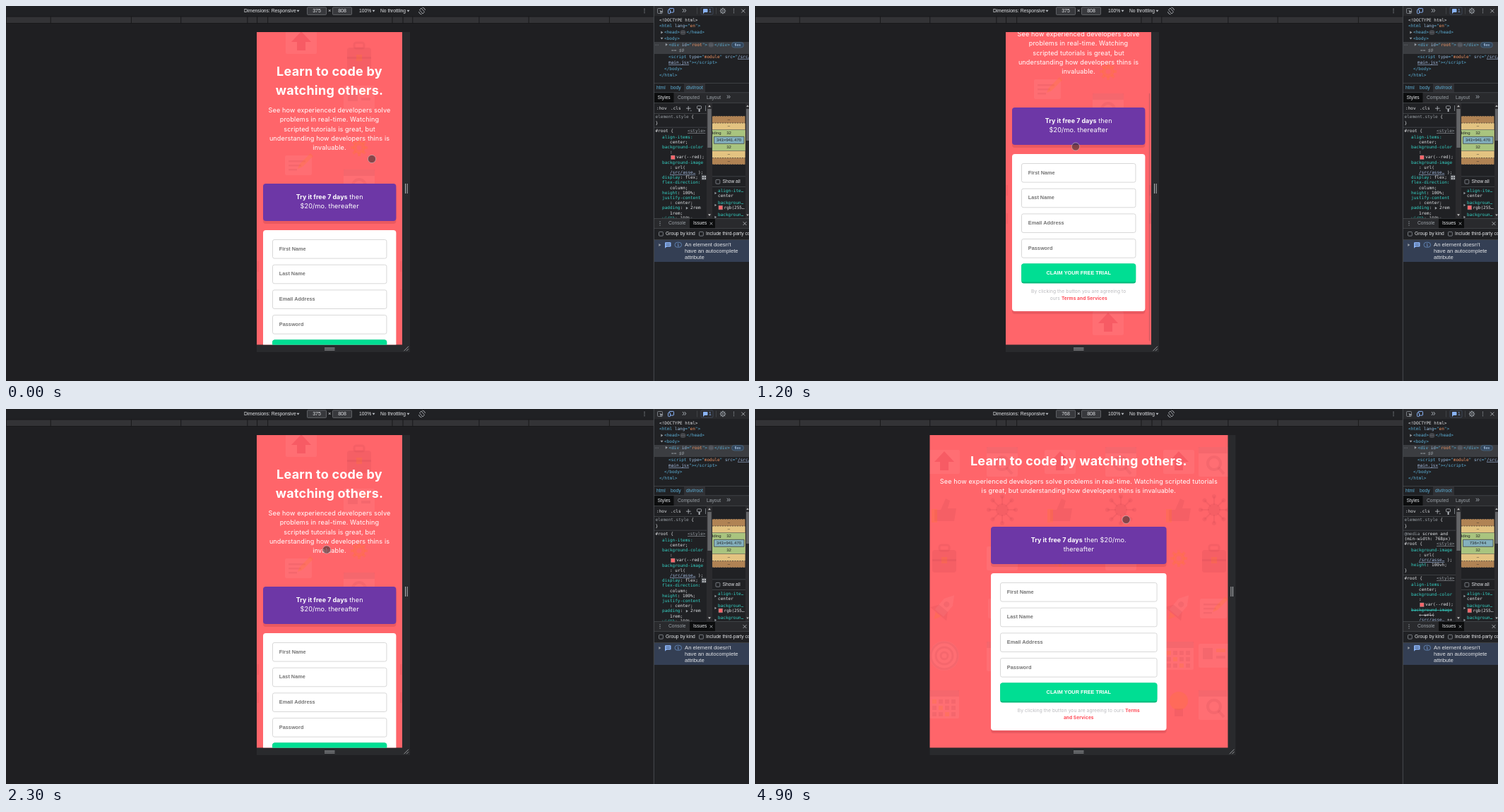
Animation, 1052 px wide and 532 px high, one loop 8 s. Source, as an HTML page with a canvas:

```html
<!DOCTYPE html>
<html lang="en">
<head>
<meta charset="utf-8">
<title>Responsive preview</title>
<style>
html, body { margin: 0; width: 100%; height: 100%; overflow: hidden; background: #202124; }
canvas { display: block; width: 1052px; height: 532px; }
</style>
</head>
<body>
<canvas id="stage"></canvas>
<script>
const W = 1052, H = 532, LOOP = 8000;
const canvas = document.getElementById('stage');
const c = canvas.getContext('2d');
const dpr = window.devicePixelRatio || 1;
canvas.width = W * dpr;
canvas.height = H * dpr;

const SANS = '"Liberation Sans", Arial, sans-serif';
const MONO = '6.04px "DejaVu Sans Mono", monospace';
const ROUND = 'Inter, sans-serif';
const FG = '#e3e5e8', DIM = '#9aa0a6', BLUE = '#8ab4f8', LINE = '#494c50';
const TAG = '#5db0d7', ATTR = '#9bbbdc', VAL = '#f29766', PROP = '#35d4c7', LINK = '#a9c1e8';
const RED = '#ff656a';

// Type styles: font and tracking
const TITLE = ['700 18px ' + ROUND, 0.24];
const BODY = ['400 9.1px ' + ROUND, 0.12];
const STRONG = ['700 8.9px ' + ROUND, 0.04];
const NOTE = ['400 6.6px ' + ROUND, 0.11];
const NOTE_B = ['700 6.6px ' + ROUND, 0.06];

// Each row is a start time followed by the values held from then on
const POINTER = [
  [0, 518, 217], [100, 498, 212], [200, 470, 204], [300, 454, 199.5],
  [2500, 460, 166], [2600, 472, 111.5], [3300], [4600, 526, 151], [4900, 525.5, 157]
];
const SCROLL = [[0, 0], [600, 40], [700, 92], [800, 108], [1600, 40.5], [1700, 0]];
const THUMB = [
  [0, 0], [600, 1], [1100, 0.7], [1200, 0.35], [1300, 0], [1600, 1],
  [2000, 0.75], [2100, 0.5], [2200, 0.25], [2300, 0]
];
const at = (keys, t) => keys.filter(k => k[0] <= t).pop().slice(1);

function rect(x, y, w, h, fill) {
  c.fillStyle = fill;
  c.fillRect(x, y, w, h);
}

function box(x, y, w, h, r, fill, stroke, width = 0.7) {
  c.beginPath();
  c.roundRect(x, y, w, h, r);
  if (fill) { c.fillStyle = fill; c.fill(); }
  if (stroke) { c.strokeStyle = stroke; c.lineWidth = width; c.stroke(); }
}

function path(pts, fill, stroke, width = 0.8) {
  c.beginPath();
  for (let i = 0; i < pts.length; i += 2) c.lineTo(pts[i], pts[i + 1]);
  if (fill) { c.closePath(); c.fillStyle = fill; c.fill(); }
  if (stroke) { c.strokeStyle = stroke; c.lineWidth = width; c.stroke(); }
}

function disc(x, y, r, fill, stroke, width = 0.8) {
  c.beginPath();
  c.arc(x, y, r, 0, Math.PI * 2);
  if (fill) { c.fillStyle = fill; c.fill(); }
  if (stroke) { c.strokeStyle = stroke; c.lineWidth = width; c.stroke(); }
}

function text(str, x, y, font, color, align = 'left', track = 0) {
  c.font = font;
  c.letterSpacing = track + 'px';
  c.textAlign = align;
  c.textBaseline = 'middle';
  c.fillStyle = color;
  c.fillText(str, x, y);
  return c.measureText(str).width;
}

const ui = (str, x, y, color = FG, size = 6.7, align = 'left') =>
  text(str, x, y, size + 'px ' + SANS, color, align);

// Centred line made of [text, style, colour] runs
function centred(x, y, ...runs) {
  const widths = runs.map(([str, [font, track]]) => {
    c.font = font;
    c.letterSpacing = track + 'px';
    return c.measureText(str).width;
  });
  x -= widths.reduce((a, b) => a + b, 0) / 2;
  runs.forEach(([str, [font, track], color = '#fff'], i) => {
    text(str, x, y, font, color, 'left', track);
    x += widths[i];
  });
}

// Colour and text pairs; a leading "_" underlines, "-" strikes through
function code(x, y, ...parts) {
  for (let i = 0; i < parts.length; i += 2) {
    const mark = parts[i][0] === '#' ? '' : parts[i][0];
    const color = mark ? parts[i].slice(1) : parts[i];
    const w = text(parts[i + 1], x, y, MONO, color);
    if (mark) rect(x, y + (mark === '_' ? 2.9 : 0.2), w, 0.6, color);
    x += w;
  }
  return x;
}

function clip(x, y, w, h, draw) {
  c.save();
  c.beginPath();
  c.rect(x, y, w, h);
  c.clip();
  draw();
  c.restore();
}

function tri(x, y, s, color, down) {
  path(down ? [x - s, y - s * 0.6, x + s, y - s * 0.6, x, y + s * 0.8]
            : [x - s * 0.6, y - s, x + s * 0.9, y, x - s * 0.6, y + s], color);
}

const dots = (x, y) => [-2.6, 0, 2.6].forEach(d => disc(x, y + d, 0.7, DIM));

function cross(x, y, s, color = '#bdc1c6') {
  path([x - s, y - s, x + s, y + s], null, color);
  path([x - s, y + s, x + s, y - s], null, color);
}

// Faint pattern behind the page
const DARK = 'rgba(165,45,65,.11)', PALE = 'rgba(255,185,190,.11)', WARM = 'rgba(255,120,40,.24)';

const icons = {
  house() {
    box(-22, -16, 44, 34, 2, PALE);
    path([0, -14, 14, 1, 6, 1, 6, 13, -6, 13, -6, 1, -14, 1], 'rgba(225,35,60,.26)');
  },
  bag() {
    box(-17, -12, 34, 32, 4, DARK);
    box(-7, -19, 14, 8, 3, null, DARK, 3);
    rect(-17, 1, 34, 3, DARK);
    rect(-4, -2, 8, 9, WARM);
  },
  card() {
    box(-22, -17, 44, 34, 2, PALE);
    rect(-16, -11, 14, 16, DARK);
    rect(3, -10, 13, 5, WARM);
    rect(3, 0, 13, 4, DARK);
  },
  gear() {
    for (let i = 0; i < 8; i++) {
      c.rotate(Math.PI / 4);
      rect(-2, -12, 4, 5, WARM);
    }
    disc(0, 0, 6, null, WARM, 5);
  },
  note() {
    box(-20, -12, 38, 28, 2, PALE);
    [-5, 1, 7].forEach((y, i) => rect(-15, y, 24 - i * 6, 2.5, DARK));
    path([-2, 7, 1, 0, 16, -15, 20, -11, 5, 4], WARM);
  },
  browser() {
    box(-22, -20, 44, 42, 2, PALE);
    rect(-22, -20, 44, 9, DARK);
    disc(0, 3, 9, null, DARK, 4);
    path([6, 9, 14, 18], null, DARK, 4);
  },
  burst() {
    for (let i = 0; i < 8; i++) {
      c.rotate(Math.PI / 4);
      rect(-1, -19, 2, 12, DARK);
      disc(0, -19, 3, DARK);
    }
    disc(0, 0, 9, DARK);
  },
  rocket() {
    c.rotate(0.7);
    path([0, -22, 8, -9, 8, 11, -8, 11, -8, -9], PALE);
    path([-8, 2, -15, 13, 15, 13, 8, 2], DARK);
    path([-5, 13, 0, 23, 5, 13], WARM);
    disc(0, -5, 4, DARK);
  },
  target() {
    disc(0, 0, 21, PALE);
    [5, 12, 19].forEach(r => disc(0, 0, r, null, DARK, 3));
  },
  calendar() {
    box(-21, -20, 42, 40, 2, PALE);
    rect(-21, -20, 42, 9, DARK);
    for (let i = 0; i < 12; i++) rect(-17 + i % 4 * 9, -7 + (i >> 2) * 9, 6, 6, i % 5 ? DARK : WARM);
  },
  bulb() {
    disc(0, -5, 13, WARM);
    rect(-6, 6, 12, 11, DARK);
  },
  thumb() {
    path([-14, 0, -5, 0, 2, -16, 8, -13, 5, -2, 17, -2, 14, 16, -14, 16], DARK);
    rect(-18, -1, 8, 19, WARM);
  }
};

function icon(kind, x, y) {
  c.save();
  c.translate(x, y);
  icons[kind]();
  c.restore();
}

const PHONE_ICONS = [
  ['house', 418, 50], ['bag', 500, 71], ['card', 500, 130], ['note', 415, 224],
  ['gear', 500, 201], ['browser', 500, 252], ['house', 500, 557]
];
const COLUMNS = [
  [268, ['house', 'thumb', 'bag', 'rocket', 'target', 'calendar']],
  [350, ['browser', 'burst', 'card', 'note', 'browser', 'gear']],
  [432, ['house', 'thumb', 'gear', 'rocket', 'target', 'calendar']],
  [518, ['browser', 'burst', 'card', 'note', 'browser', 'gear']],
  [600, ['house', 'thumb', 'gear', 'rocket', 'calendar', 'bulb']],
  [650, ['browser', 'burst', 'bag', 'note', 'card', 'browser']]
];

// Offer banner and sign-up card, placed from the banner's top
const SHADE = 'rgba(130,30,50,.17)';

function form(x, w, top, offer, terms) {
  const mid = x + w / 2, card = top + 66, inner = x + 13.2, iw = w - 26.4;
  box(x, top + 4, w, 53, 4, SHADE);
  box(x, top, w, 53, 4, '#6d37a6');
  offer.forEach((runs, i) => centred(mid, top + 19.5 + i * 13.1, ...runs));
  box(x, card + 4, w, 223, 4, SHADE);
  box(x, card, w, 223, 4, '#fff');
  ['First Name', 'Last Name', 'Email Address', 'Password'].forEach((label, i) => {
    const y = card + 13.2 + i * 35.7;
    box(inner + 0.3, y + 0.3, iw - 0.6, 26.6, 2.5, '#fff', '#cfcfcf', 0.8);
    text(label, inner + 9.6, y + 13.4, 'bold 7.32px ' + SANS, '#757575');
  });
  box(inner, card + 155.6, iw, 28, 3.5, '#00b97a');
  box(inner, card + 155.6, iw, 26, 3.5, '#00de93');
  text('CLAIM YOUR FREE TRIAL', mid, card + 168.7, 'bold 7.32px ' + SANS, '#fff', 'center');
  terms.forEach((runs, i) => centred(mid, card + 195 + i * 9.9, ...runs));
}

const GREY = '#b9b9bd', TERMS = '#ff4c58';

function phone(scroll, thumb) {
  clip(355, 37, 206, 443.5, () => {
    rect(355, 37, 206, 444, RED);
    c.save();
    c.translate(0, -scroll);
    PHONE_ICONS.forEach(i => icon(...i));
    [355, 558].forEach(x => [362, 402].forEach(y => rect(x, y, 3, 15, DARK)));
    centred(458, 94, ['Learn to code by', TITLE]);
    centred(458, 120.3, ['watching others.', TITLE]);
    ['See how experienced developers solve', 'problems in real-time. Watching',
     'scripted tutorials is great, but', 'understanding how developers thins is', 'invaluable.'
    ].forEach((line, i) => centred(458, 148.4 + i * 13.2, [line, BODY]));
    form(364, 188.4, 252,
      [[['Try it free 7 days', STRONG], [' then', BODY]], [['$20/mo. thereafter', BODY]]],
      [[['By clicking the button you are agreeing to', NOTE, GREY]],
       [['ours ', NOTE, GREY], ['Terms and Services', NOTE_B, TERMS]]]);
    c.restore();
    if (thumb) {
      c.globalAlpha = thumb;
      box(557.8, 39 + scroll * 0.785, 1.8, 351.5, 1, 'rgba(115,75,85,.75)');
      c.globalAlpha = 1;
    }
  });
}

function tablet() {
  clip(247.5, 37, 422, 443.5, () => {
    rect(247, 37, 423, 444, RED);
    COLUMNS.forEach(([x, kinds]) => kinds.forEach((kind, i) => icon(kind, x, 74 + i * 69)));
    centred(458.3, 75, ['Learn to code by watching others.', TITLE]);
    centred(458.3, 103.2, ['See how experienced developers solve problems in real-time. Watching scripted tutorials', BODY]);
    centred(458.3, 116.3, ['is great, but understanding how developers thins is invaluable.', BODY]);
    form(334, 248.6, 167,
      [[['Try it free 7 days', STRONG], [' then $20/mo.', BODY]], [['thereafter', BODY]]],
      [[['By clicking the button you are agreeing to ours ', NOTE, GREY], ['Terms', NOTE_B, TERMS]],
       [['and Services', NOTE_B, TERMS]]]);
  });
}

function frame(x, right) {
  rect(x, 37, right - x + 11, 454, '#292a2d');
  rect(right + 4, 252, 1, 14, '#b4b6b9');
  rect(right + 6.6, 252, 1, 14, '#b4b6b9');
  rect(451, 484.8, 14.5, 1, '#b4b6b9');
  rect(451, 487.4, 14.5, 1, '#b4b6b9');
  path([right + 2.5, 489.3, right + 9, 482.8], null, '#b4b6b9');
  path([right + 6, 489.3, right + 9, 486.3], null, '#b4b6b9');
}

function toolbar(width, hover) {
  rect(0, 0, 917, 14, '#202124');
  ui('Dimensions: Responsive', 337, 7);
  tri(413.5, 7, 2, '#bdc1c6', true);
  [[426.5, width], [462.5, '808']].forEach(([x, value]) => {
    box(x, 1.8, 27, 10.6, 1, '#38393d', '#74777c');
    ui(value, x + 13.5, 7, FG, 7, 'center');
  });
  ui('×', 458.2, 7, FG, 7.5, 'center');
  ui('100%', 500, 7);
  tri(520.5, 7, 2, '#bdc1c6', true);
  ui('No throttling', 530, 7);
  tri(569.5, 7, 2, '#bdc1c6', true);
  path([585.5, 5.5, 588, 3, 592.5, 8.5, 590, 11, 585.5, 5.5], null, '#bdc1c6');
  path([589.5, 2, 592.5, 3.5, 593.5, 6], null, '#bdc1c6');
  path([584.5, 8, 585.5, 10.5, 588.5, 12], null, '#bdc1c6');
  dots(904, 7);

  rect(0, 14.5, 917, 10.5, '#19191b');
  rect(0, 15.5, 917, 8.5, '#333336');
  if (hover) rect(248, 15.5, 421, 8.5, '#49494b');
  [320, 375, 425, 768, 1024, 1440].forEach(px => {
    const half = px * 0.2745;
    rect(458 - half, 15, 1, 9.5, '#19191b');
    rect(458.6 + half, 15, 1, 9.5, '#19191b');
  });
  rect(0, 15, 0.8, 9.5, '#19191b');
  if (hover) ui('Tablet – 768px', 458, 20, FG, 6.7, 'center');
}

function pill(x, y, label, w, fill, color) {
  box(x, y - 3.5, w, 7, 3.5, fill);
  ui(label, x + w / 2, y, color, 5.6, 'center');
}

function elements() {
  rect(917, 0, 135, 14, '#292a2d');
  box(922.5, 3.5, 7, 7, 1, null, DIM);
  path([925.5, 6, 930.5, 8, 928, 9, 927.5, 11.5], DIM);
  box(939, 3.4, 6.5, 5.6, 0.8, null, BLUE, 1);
  box(937.5, 5.4, 3, 5.2, 0.8, '#292a2d', BLUE, 1);
  ui('»', 957, 6.3, DIM, 12);
  box(984, 2, 17, 10, 1.5, null, '#4a5568');
  box(987, 4, 6.5, 5, 0.8, BLUE);
  path([987, 8, 990, 8, 987, 11], BLUE);
  ui('1', 995, 7, BLUE);
  rect(978, 2.5, 0.7, 9, LINE);
  rect(1005, 2.5, 0.7, 9, LINE);
  for (let i = 0; i < 8; i++) {
    const a = i * Math.PI / 4;
    disc(1015 + 3.6 * Math.cos(a), 7 + 3.6 * Math.sin(a), 0.8, DIM);
  }
  disc(1015, 7, 2.8, null, DIM, 0.9);
  disc(1015, 7, 1, DIM);
  dots(1030.5, 7);
  cross(1043.8, 7, 2.5);

  code(925, 20, FG, '<!DOCTYPE html>');
  code(925, 28.8, TAG, '<html ', ATTR, 'lang', TAG, '="', VAL, 'en', TAG, '">');
  tri(928.5, 37.4, 2, DIM);
  code(932, 37.4, TAG, '<head>');
  pill(954.5, 37.4, '⋯', 8, '#43454a', DIM);
  code(963.5, 37.4, TAG, '</head>');
  tri(928.5, 46, 2, DIM, true);
  code(932, 46, TAG, '<body>');
  rect(918, 51, 134, 17, '#3b3d41');
  ui('⋯', 918.5, 55, DIM, 6);
  tri(935, 54.8, 2, DIM);
  code(938.5, 55, TAG, '<div ', ATTR, 'id', TAG, '="', VAL, 'root', TAG, '">');
  pill(994.5, 55, '⋯', 7.5, '#50535a', DIM);
  code(1003, 55, TAG, '</div>');
  box(1027.5, 51.5, 17, 7.5, 3.7, '#33475d', '#52708c');
  ui('flex', 1036, 55.3, '#b5d4f5', 5.8, 'center');
  text('== $0', 942, 63.4, 'italic ' + MONO, DIM);
  code(938, 72, TAG, '<script ', ATTR, 'type', TAG, '="', VAL, 'module', TAG, '" ', ATTR, 'src', TAG, '="', '_' + LINK, '/src/');
  code(938, 80.5, '_' + LINK, 'main.jsx', TAG, '"></' + 'script>');
  code(932, 89.2, TAG, '</body>');
  code(925, 98, TAG, '</html>');

  rect(917, 109, 135, 0.7, LINE);
  rect(960, 109.7, 30, 13, '#303135');
  ui('html', 921, 115.8, TAG);
  ui('body', 941, 115.8, TAG);
  ui('div#root', 963, 115.8, TAG);
  rect(917, 122.5, 135, 15, '#292a2d');
  rect(917, 122.5, 135, 0.7, LINE);
  rect(917, 123.2, 28.5, 14, '#0c0d0e');
  ui('Styles', 922.5, 130);
  ui('Computed', 951, 130, DIM);
  ui('Layout', 992, 130, DIM);
  ui('»', 1020, 129, DIM, 11);
  rect(917, 137.3, 135, 0.7, LINE);
}

const swatch = (x, y) => box(x, y - 2.8, 5.6, 5.6, 0, RED, '#888', 0.5);

function rule(y) {
  code(919.5, y, FG, '#root {');
  code(965, y, '_' + DIM, '<style>');
}

const url = (y, end) => code(940, y, '_' + LINK, '/src/asse…', FG, end);

function baseStyles(y, off) {
  const mark = off ? '-' : '';
  code(929, y, PROP, 'align-items:');
  code(940, y + 7.2, FG, 'center;');
  code(929, y + 14.4, PROP, 'background-color');
  code(940, y + 21.6, FG, ':');
  swatch(941.5, y + 28.8);
  code(949, y + 28.8, FG, 'var(--red);');
  code(929, y + 36, mark + PROP, 'background-image');
  code(940, y + 43.2, mark + FG, ': url(');
  url(y + 50.4, off ? ' ++' : ' );');
  if (off) return;
  code(929, y + 57.6, PROP, 'display', FG, ': flex;');
  box(984.5, y + 53.8, 7, 7, 1, '#55585d');
  [986, 989].forEach(x => [55.2, 58].forEach(d => rect(x, y + d, 1.8, 1.8, '#d0d3d6')));
  code(929, y + 64.8, PROP, 'flex-direction:');
  code(940, y + 72, FG, 'column;');
  code(929, y + 79.2, PROP, 'height', FG, ': 100%;');
  code(929, y + 86.4, PROP, 'justify-content');
  code(940, y + 93.6, FG, ': center;');
  code(929, y + 100.8, PROP, 'padding', FG, ':');
  tri(964, y + 100.8, 2, DIM);
  code(969, y + 100.8, FG, '2rem');
  code(940, y + 108, FG, '1rem;');
  code(929, y + 115.2, PROP, 'width', FG, ': 100%;');
}

function styles(wide) {
  code(921, 145.2, FG, ':hov');
  code(941, 145.2, FG, '.cls');
  path([963, 145.2, 969.5, 145.2], null, '#bdc1c6');
  path([966.2, 142, 966.2, 148.5], null, '#bdc1c6');
  tri(970, 148.5, 1, DIM);
  box(978.5, 141.8, 6, 4, 0.8, null, '#bdc1c6');
  rect(980.7, 146, 1.8, 4, '#bdc1c6');
  rect(990, 141, 0.7, 8, DIM);
  rect(917, 152, 75, 0.7, LINE);
  clip(917, 152, 75, 148.5, () => {
    code(919.5, 157.2, DIM, 'element.style', FG, ' {');
    code(919.5, 166, FG, '}');
    rect(917, 171.8, 75, 0.7, LINE);
    if (wide) {
      code(919.5, 177.2, DIM, '@media', FG, ' screen and');
      code(919.5, 184.3, FG, '(min-width: 768px)');
      rule(191.4);
      code(929, 200, PROP, 'background-image');
      code(940, 207.2, FG, ': url(');
      url(214.4, ' );');
      code(929, 221.6, PROP, 'height', FG, ': 100vh;');
      code(919.5, 229.5, FG, '}');
      rect(917, 235, 75, 0.7, LINE);
      rule(240.4);
      baseStyles(249, true);
    } else {
      rule(177.2);
      baseStyles(186, false);
    }
  });
  rect(992, 138, 8, 163, '#2b2b2e');
  box(993.3, 146, 5.5, 55, 0, '#646568');
  tri(996, 142, -2, '#c0c0c0', true);
  tri(996, 296.5, 2, '#c0c0c0', true);
}

function boxModel(size) {
  clip(1000, 138, 47, 163, () => {
    rect(1000, 156, 46.5, 69, '#b08354');
    rect(1000, 166, 46.5, 49.5, '#e3c381');
    rect(1000, 175.5, 46.5, 30, '#a9c47f');
    c.setLineDash([2, 1.5]);
    [156.3, 166, 215.5, 224.8].forEach(y => path([1000, y, 1047, y], null, '#333', 0.7));
    c.setLineDash([]);
    path([1000, 175.5, 1047, 175.5], null, '#555', 0.6);
    path([1000, 205.5, 1047, 205.5], null, '#555', 0.6);
    box(1002.5, 185.3, 42.5, 10, 0, '#84b0bd', '#444', 0.8);
    [161, 170.8, 210.5, 220.3].forEach(y => ui('–', 1023.5, y, '#222', 6, 'center'));
    ui('padding', 1012.5, 180.6, '#222', 6, 'right');
    ui('32', 1023.5, 180.6, '#222', 6, 'center');
    ui('32', 1023.5, 200.4, '#222', 6, 'center');
    ui(size, 1023.5, 190.4, '#222', 6, 'center');
    rect(1000, 241.5, 47, 0.7, LINE);
    box(1005, 246.4, 5.8, 5.8, 1, null, DIM);
    ui('Show all', 1014.5, 249.4);
    rect(1000, 256, 47, 0.7, LINE);
    [262, 279, 296].forEach((y, i) => {
      tri(1004.5, y + 3.5, 1.8, DIM);
      code(1008, y, PROP, i ? 'backgroun…' : 'align-ite…');
    });
    code(1008, 269, FG, 'center');
    swatch(1009, 286);
    code(1016.5, 286, FG, 'rgb(255…');
  });
  rect(1047, 138, 5, 163, '#2b2b2e');
  rect(1048, 146, 4, 45, '#646568');
  tri(1050, 142, -1.8, '#c0c0c0', true);
  tri(1050, 296.5, 1.8, '#c0c0c0', true);
}

function drawer() {
  rect(917, 301, 135, 14.5, '#292a2d');
  rect(917, 301, 135, 0.7, LINE);
  rect(968, 301.7, 36, 13.8, '#0c0d0e');
  dots(926, 308.5);
  ui('Console', 938, 308.6, DIM);
  ui('Issues', 973, 308.6);
  cross(998.5, 308.6, 1.8);
  cross(1046, 308.6, 2.4);
  rect(917, 315.3, 135, 0.7, LINE);
  box(924.5, 320.4, 5.8, 5.8, 1, null, DIM);
  ui('Group by kind', 934, 323.6);
  box(981.5, 320.4, 5.8, 5.8, 1, null, DIM);
  ui('Include third-party cookie issues', 991, 323.6);
  rect(917, 331, 135, 0.7, LINE);
  rect(918, 332, 134, 31, '#343f54');
  tri(925.5, 339, 2, DIM);
  box(933, 335.3, 8.5, 6.3, 0.8, BLUE);
  path([933, 340, 937, 340, 933, 343.8], BLUE);
  rect(934.5, 337, 5.5, 0.7, '#343f54');
  rect(934.5, 339, 5.5, 0.7, '#343f54');
  box(947, 335.3, 9.5, 7, 3.5, null, '#6f9bd1');
  ui('1', 951.7, 339, BLUE, 5.5, 'center');
  ["An element doesn't", 'have an autocomplete', 'attribute'].forEach((line, i) =>
    ui(line, 961, 338.8 + i * 8.8, FG, 7.7));
}

function draw(t) {
  const wide = t >= 4600, hover = t >= 3300 && !wide;
  c.setTransform(dpr, 0, 0, dpr, 0, 0);
  rect(0, 0, W, H, '#202124');
  rect(0, 25, 917, 507, '#1f1f22');
  toolbar(wide ? '768' : '375', hover);
  if (wide) {
    frame(247.5, 669.5);
    tablet();
  } else {
    frame(355, 561);
    phone(at(SCROLL, t)[0], at(THUMB, t)[0]);
  }
  elements();
  styles(wide);
  boxModel(wide ? '736×744' : '343×941.470');
  drawer();
  rect(916.8, 0, 1, H, LINE);

  const [x, y] = at(POINTER, t);
  if (x) disc(x, y, 5.6, 'rgba(52,46,50,.58)', 'rgba(205,190,195,.6)', 1);
  if (hover) {
    path([601, 18.3, 601.8, 28.2, 604.2, 25.6, 609, 25, 601, 18.3], '#000', '#fff', 0.9);
  }
}

const start = performance.now();
function tick() {
  draw((performance.now() - start) % LOOP);
  requestAnimationFrame(tick);
}
tick();
</script>
</body>
</html>
```
